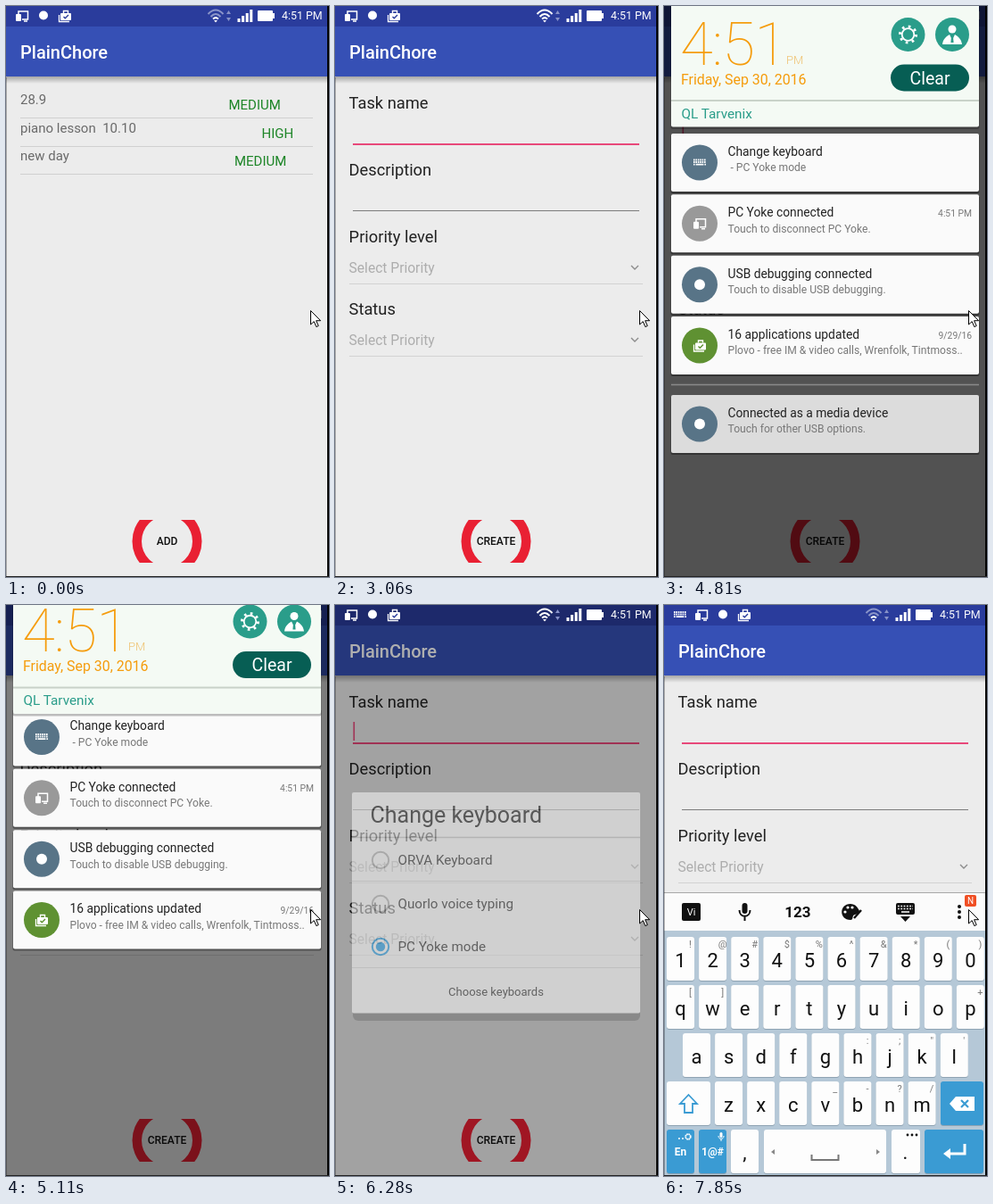
These frames come from a looping animation (362 by 640 pixels, 8000 ms). An HTML page:

```html
<!DOCTYPE html>
<html lang="en">
<head>
<meta charset="utf-8">
<title>Todo app</title>
<style>
  html, body { margin: 0; width: 100%; height: 100%; overflow: hidden; background: #ececec; }
  svg { display: block; width: 100vw; height: 100vh; }
  text { font-family: Roboto, "Open Sans", sans-serif; white-space: pre; }
</style>
</head>
<body>
<svg id="stage" viewBox="0 0 362 640"></svg>
<script>
const LOOP = 8000;
const TICKS = [0, 590, 730, 870, 1020, 1320, 1600, 2060, 2630, 3060, 3490,
  4070, 4220, 4370, 4520, 4660, 4810, 4960, 5110, 5260, 5410, 5560, 5700,
  6280, 6430, 6560, 6700, 6850, 7000, 7140, 7290, 7420, 7560, 7700, 7850];

const INK = '#222', BLUE = '#3650b5', KEY = '#3a9bd3', TEAL = '#2a9d8a', ORANGE = '#f59c0c', SLATE = '#587487';

// Drawing helpers
const esc = s => s.replace(/&/g, '&amp;').replace(/</g, '&lt;');
const text = (x, mid, s, size, fill = INK, extra = '') =>
  `<text x="${x}" y="${mid + size * 0.355}" font-size="${size}" fill="${fill}" ${extra}>${esc(s)}</text>`;
const MID = 'text-anchor="middle" ', END = 'text-anchor="end" ', MEDIUM = 'font-weight="500"', BOLD = 'font-weight="700"';
const rect = (x, y, w, h, fill, r = 0, extra = '') =>
  `<rect x="${x}" y="${y}" width="${w}" height="${h}" rx="${r}" fill="${fill}" ${extra}/>`;
const dot = (x, y, r, fill, extra = '') => `<circle cx="${x}" cy="${y}" r="${r}" fill="${fill}" ${extra}/>`;
const path = (d, fill, extra = '') => `<path d="${d}" fill="${fill}" ${extra}/>`;
const line = (d, color, w = 1, extra = '') => path(d, 'none', `stroke="${color}" stroke-width="${w}" ${extra}`);
const at = (x, y, body, scale = 1) => `<g transform="translate(${x} ${y}) scale(${scale})">${body}</g>`;
const group = (id, body, extra = '') => `<g id="${id}" ${extra}>${body}</g>`;

// Icons, centred on their own origin
const devices = line('M-4 -1V-5H6.5V4H0M2 6H6', '#fff', 1.5) + rect(-7, -2, 6, 8, '#fff', 1);
const bag = hole => rect(-5, -3, 12, 8, '#fff', 1) + line('M-1.5 -3V-5.5H3.5V-3', '#fff', 1.4) +
  line('M-6.5 -1V6.5H5', '#fff', 1.3) + line('M-1.5 1L.3 2.8L4 -1', hole, 1.4);
const keys = [-3, -0.5].map(y => line(`M-7 ${y}H7`, '#fff', 1.8, 'stroke-dasharray="1.6 .8"')).join('') +
  line('M-7 2.2H-5.4M-4.4 2.2H4.4M5.4 2.2H7', '#fff', 1.8);
const mic = fill => rect(-3, -10, 6, 12, fill, 3) + line('M-6 -2C-6 7 6 7 6 -2M0 5V10', fill, 2);
const gear = dot(0, 0, 6.8, 'none', 'stroke="#fff" stroke-width="1.8"') +
  dot(0, 0, 9, 'none', 'stroke="#fff" stroke-width="3" stroke-dasharray="2.6 4.47"');
const person = dot(0, -6, 4.5, '#fff') + path('M-11 11C-10 4 -6 2 -3 0L0 6L3 0C6 2 10 4 11 11Z', '#fff') + path('M-1 2H1L1.6 9H-1.6Z', TEAL);

const ring = path('M141.5 600a39 39 0 1 1 78 0a39 39 0 1 1 -78 0M152 600a28.5 28.5 0 1 0 57 0a28.5 28.5 0 1 0 -57 0',
  '#e92033', 'clip-path="url(#buttonClip)"');
const button = label => ring + text(180.5, 600, label, 12, '#111', MID + MEDIUM);
const page = body => rect(0, 23, 360, 617, '#ececec') + rect(0, 79, 360, 8, 'url(#drop)') + rect(0, 23, 360, 56, BLUE) +
  text(16, 52, 'PlainChore', 20, '#fff', MEDIUM) + body;

function listPage() {
  const rows = [['28.9', 105, 'MEDIUM', 249.5], ['piano lesson  10.10', 137, 'HIGH', 286.5], ['new day', 168, 'MEDIUM', 256]];
  return page(rows.map(([name, y, level, x]) => text(16, y, name, 15, '#6a6a6a') + text(x, y + 6, level, 15, '#1d8527') +
    line(`M16 ${y + 20.5}H344`, '#d0d0d0')).join('') + button('ADD'));
}

function formPage() {
  const labels = [['Task name', 109], ['Description', 184], ['Priority level', 259], ['Status', 340]];
  const selects = [293, 374].map(y => text(15.6, y, 'Select Priority', 15.6, '#adadad') +
    line(`M332 ${y - 2}l4 4l4 -4`, '#8c8c8c', 1.4) + line(`M16 ${y + 18.5}H345`, '#d2d2d2'));
  return page(labels.map(([s, y]) => text(15.6, y, s, 18.3)).join('') + selects.join('') +
    line('M20 155H341', '#e8497a', 1.8) + line('M20 229.5H341', '#7c7c7c', 1.2) +
    rect(20.5, 131, 1.6, 21, '#e8497a', 0, 'id="caret"') + button('CREATE'));
}

function statusIcons() {
  const left = at(18, 11, devices) + dot(42, 10.5, 5, '#fff') + at(66, 11, bag('#2a3c9c'));
  const bars = [4, 7, 10, 14].map((h, i) => rect(259.5 + i * 4.6, 18 - h, 3, h, '#fff')).join('');
  return group('leftIcons', left) + group('keyIcon', at(18, 11, keys)) +
    group('wifi', line('M226.5 9Q235 0 243.5 9', '#fff', 2) + line('M229.5 12Q235 6 240.5 12', '#fff', 2)) +
    line('M232 14.5Q235 11.8 238 14.5', '#fff', 2) + path('M233 16H237L235 18.5Z', '#fff') +
    path('M247 9L249.5 5L252 9ZM247 13H252L249.5 17Z', '#8791c8') + bars +
    rect(282, 5, 17, 12, '#fff', 1) + rect(299, 8, 2, 6, '#fff') + text(309, 11, '4:51 PM', 12.4, '#fff');
}

function dialog() {
  const options = [['ORVA Keyboard', 286], ['Quorlo voice typing', 335], ['PC Yoke mode', 383]];
  return rect(20, 214, 322, 252, '#000', 6, 'opacity=".3"') + rect(19, 210, 323, 247.5, '#fff', 2) +
    text(39.5, 235, 'Change keyboard', 25, '#111') + line('M19 260.5H342', '#c4c4c4', 1.4) +
    line('M19 309.5H342M19 406.5H342', '#dcdcdc') +
    options.map(([s, y], i) => dot(51, y, 9.2, 'none', `stroke="${i == 2 ? '#1a9ce8' : '#b0b0b0'}" stroke-width="2"`) +
      (i == 2 ? dot(51, y, 5.2, '#1a9ce8') : '') + text(70.5, y, s, 15.2)).join('') +
    text(180.5, 433, 'Choose keyboards', 13, INK, MID);
}

function keyboard() {
  const cap = (x, y, w, fill = '#fdfdfd') => rect(x, y + 1, w, 49, '#8fa3b3', 3) + rect(x, y, w, 49, fill, 3);
  const rows = [['1234567890', 18.5, 372, '!@#$%^&*()'], ['qwertyuiop', 18.5, 426, '[]       +'],
    ['asdfghjkl', 36.5, 480, '     :;"\''], ['zxcvbnm', 72.5, 534, '   _-?/']];
  const letters = rows.map(([row, x0, y, hints]) => [...row].map((c, i) => {
    const x = x0 + i * 36.1;
    return cap(x - 15.5, y, 31) + text(x, y + 26, c, 22, '#111', MID) + text(x + 11, y + 8, hints[i] ?? '', 11, '#777', MID);
  }).join('')).join('');
  const tools = rect(20, 334, 21, 20, '#111', 2) + text(30.5, 344, 'Vi', 11, '#fff', MID) + at(90.5, 344, mic('#111')) +
    text(150, 344, '123', 17, '#111', MID + BOLD) +
    path('M209 335C196 335 196 353 209 353C213 353 210 348 214 347C219 346 220 344 218 341C216 337 213 335 209 335Z', '#111') +
    [[203, 344], [206, 339], [211, 339]].map(([x, y]) => dot(x, y, 1.6, '#fff')).join('') + line('M213 351L221 342', '#111', 2.4) +
    rect(260, 334, 21, 13, '#111', 2) + [337.5, 340.5].map(y => line(`M262 ${y}H279`, '#fff', 1.5, 'stroke-dasharray="1.8 1.5"')).join('') +
    line('M266 344H275', '#fff', 1.5) + path('M265 349H276L270.5 355Z', '#111') +
    [338, 344, 350].map(y => dot(331, y, 2, '#111')).join('') +
    rect(337, 325, 13, 13, '#f04e23', 2) + text(343.5, 331.5, 'N', 10, '#fff', MID);
  const bottom = cap(3, 534, 49) + line('M27.5 549L37 559H32V569H23V559H18Z', KEY, 1.8) +
    cap(310, 534, 48, KEY) + path('M320 559L327 551H348V567H327Z', '#fff') + line('M333 555L341 563M341 555L333 563', KEY, 2.2) +
    cap(3, 588, 31, KEY) + text(18.5, 613, 'En', 12, '#fff', MID + BOLD) + dot(17, 598, 1, '#fff') + dot(21, 598, 1, '#fff') +
    dot(27, 596, 2.8, 'none', 'stroke="#fff" stroke-width="1.8" stroke-dasharray="1.7 .5"') +
    cap(39, 588, 31, KEY) + text(54.5, 613, '1@#', 12, '#fff', MID + BOLD) + at(64, 596, mic('#fff'), 0.5) +
    cap(75, 588, 31) + text(90.5, 613, ',', 22, '#111', MID) +
    cap(112, 588, 137) + path('M124 610V616L120 613ZM238 610V616L242 613Z', '#888') + line('M165.5 616V622H195.5V616', '#777', 2) +
    cap(255, 588, 32) + text(270.5, 613, '.', 22, '#111', MID) + [273, 278, 283].map(x => dot(x, 594, 1.4, '#111')).join('') +
    cap(292, 588, 66, KEY) + line('M337 604V615H318', '#fff', 3) + path('M313 615L321 609V621Z', '#fff');
  return rect(0, 322, 360, 44, '#fbfbfb') + line('M0 322.5H360', '#a8a8a8') + rect(0, 365, 360, 275, '#b5c8d7') + tools + letters + bottom;
}

function shadeCards() {
  const white = '#fff';
  const cards = [
    [143, SLATE, keys, 'Change keyboard', ' - PC Yoke mode', ''],
    [211.3, '#999', devices, 'PC Yoke connected', 'Touch to disconnect PC Yoke.', '4:51 PM'],
    [279.7, SLATE, dot(0, 0, 6, white), 'USB debugging connected', 'Touch to disable USB debugging.', ''],
    [348, '#5f9132', bag('#5f9132'), '16 applications updated', 'Plovo - free IM & video calls, Wrenfolk, Tintmoss..', '9/29/16'],
    [436, '#587487', dot(0, 0, 6, white), 'Connected as a media device', 'Touch for other USB options.', '']];
  return cards.map(([y, color, icon, title, note, time], i) =>
    rect(7.5, y + 1, 346, 66, '#000', 2, 'opacity=".35"') + rect(8, y, 345, 65, i == 4 ? '#dcdcdc' : '#fafafa', 2) +
    dot(40, y + 32.5, 20, color) + at(40, y + 32.5, icon) + text(71.5, y + 20, title, 13.8) +
    text(71.5, y + 38, note, 12.1, '#777') + text(345, y + 21.5, time, 10.3, '#777', END)).join('') +
    line('M8 424.5H353', '#8a8a8a', 1.4);
}

function shadeHead() {
  return rect(7.5, -60, 346, 198, '#000', 2, 'opacity=".25"') + rect(8, -60, 345, 195.5, '#f4faf4', 2) +
    rect(8, 105, 345, 2, '#c9d2c9') +
    text(18, 42, '4:51', 67, ORANGE, 'font-weight="100" letter-spacing="-.7"') + text(137, 60, 'PM', 13, '#efc06c', 'font-weight="300"') +
    text(19, 82, 'Friday, Sep 30, 2016', 15.9, ORANGE) +
    dot(273.5, 32, 19, TEAL) + at(273.5, 32, gear) + dot(323, 32, 19, TEAL) + at(323, 32, person) +
    rect(254, 65.5, 88, 30, '#075e54', 15) + text(298, 81, 'Clear', 19.5, '#fff', MID) +
    text(19.5, 120.5, 'QL Tarvenix', 15.3, TEAL);
}

const $ = id => document.getElementById(id);
$('stage').innerHTML = `<defs>
  <linearGradient id="drop" x2="0" y2="1"><stop stop-opacity=".3"/><stop offset="1" stop-opacity="0"/></linearGradient>
  <clipPath id="buttonClip"><rect x="141" y="576" width="80" height="48"/></clipPath>
  <clipPath id="cardClip"><rect id="cardWindow" width="362"/></clipPath></defs>` +
  group('list', listPage()) + group('form', formPage()) + rect(0, 0, 360, 23, '#2a3c9c') +
  rect(0, 0, 362, 640, '#000', 0, 'id="dim"') + group('dialog', dialog()) + statusIcons() + group('keyboard', keyboard()) +
  rect(0, 0, 362, 640, '#000', 0, 'id="scrim"') +
  group('shade', `<g clip-path="url(#cardClip)">${group('cards', shadeCards())}</g>` + group('head', shadeHead())) +
  rect(0, 80, 1, 560, '#000', 0, 'opacity=".3"') + rect(360, 0, 2, 640, '#000') + rect(0, 639, 362, 1, '#222') +
  path('M341.5 341.5V357L345.2 353.6L347.8 359.6L350.2 358.5L347.6 352.7H352.6Z', '#fff', 'stroke="#000"');

// Motion
const clamp = v => Math.max(0, Math.min(1, v));
const ramp = (t, from, to) => clamp((t - from) / (to - from));
const out = u => 1 - (1 - u) ** 3;
const set = (id, name, value) => $(id).setAttribute(name, value);
const fade = (id, a) => { set(id, 'opacity', a); set(id, 'visibility', a > 0 ? 'visible' : 'hidden'); };
const shift = (id, x, y) => set(id, 'transform', `translate(${x} ${y})`);

function draw(t) {
  const enter = out(ramp(t, 560, 1020));
  fade('form', t < 590 ? 0 : enter);
  shift('form', 0, 50 * (1 - enter));
  const caretOff = t < 590 || (t >= 2060 && t < 2630) || (t >= 3060 && t < 3490) || t >= 7290;
  fade('caret', caretOff ? 0 : 1);

  // Shade: 0 is the first peek, 1 is fully open, below 0 slides away.
  const open = t < 4960 ? out(ramp(t, 4070, 4660)) : 1 - 1.7 * ramp(t, 4960, 5560) ** 1.3;
  const shown = t >= 4070 && t < 5560;
  fade('shade', shown ? 1 : 0);
  shift('head', 0, -48 * (1 - open));
  shift('cards', 0, -98 * (1 - open));
  set('cardWindow', 'height', Math.max(0, 112 + 393 * open));
  set('cards', 'opacity', 0.75 + 0.25 * clamp(open * 2));
  fade('scrim', shown ? 0.02 + 0.63 * clamp(open) : 0);

  const pop = ramp(t, 5110, 5410) * (1 - ramp(t, 6130, 6430));
  fade('dim', 0.625 * pop);
  fade('dialog', pop);

  const rise = out(ramp(t, 6700, 7140));
  fade('keyboard', clamp(rise * 1.5));
  shift('keyboard', 0, 318 * (1 - rise));

  const keyMode = t >= 6430;
  shift('leftIcons', keyMode ? 24 : 0, 0);
  fade('keyIcon', keyMode ? 1 : 0);
  set('wifi', 'opacity', t >= 1320 && t < 7420 ? 1 : 0.45);
}

const start = performance.now();
function loop() {
  const now = (performance.now() - start) % LOOP;
  draw(TICKS.findLast(tick => tick <= now) ?? 0);
  requestAnimationFrame(loop);
}
loop();
</script>
</body>
</html>
```
